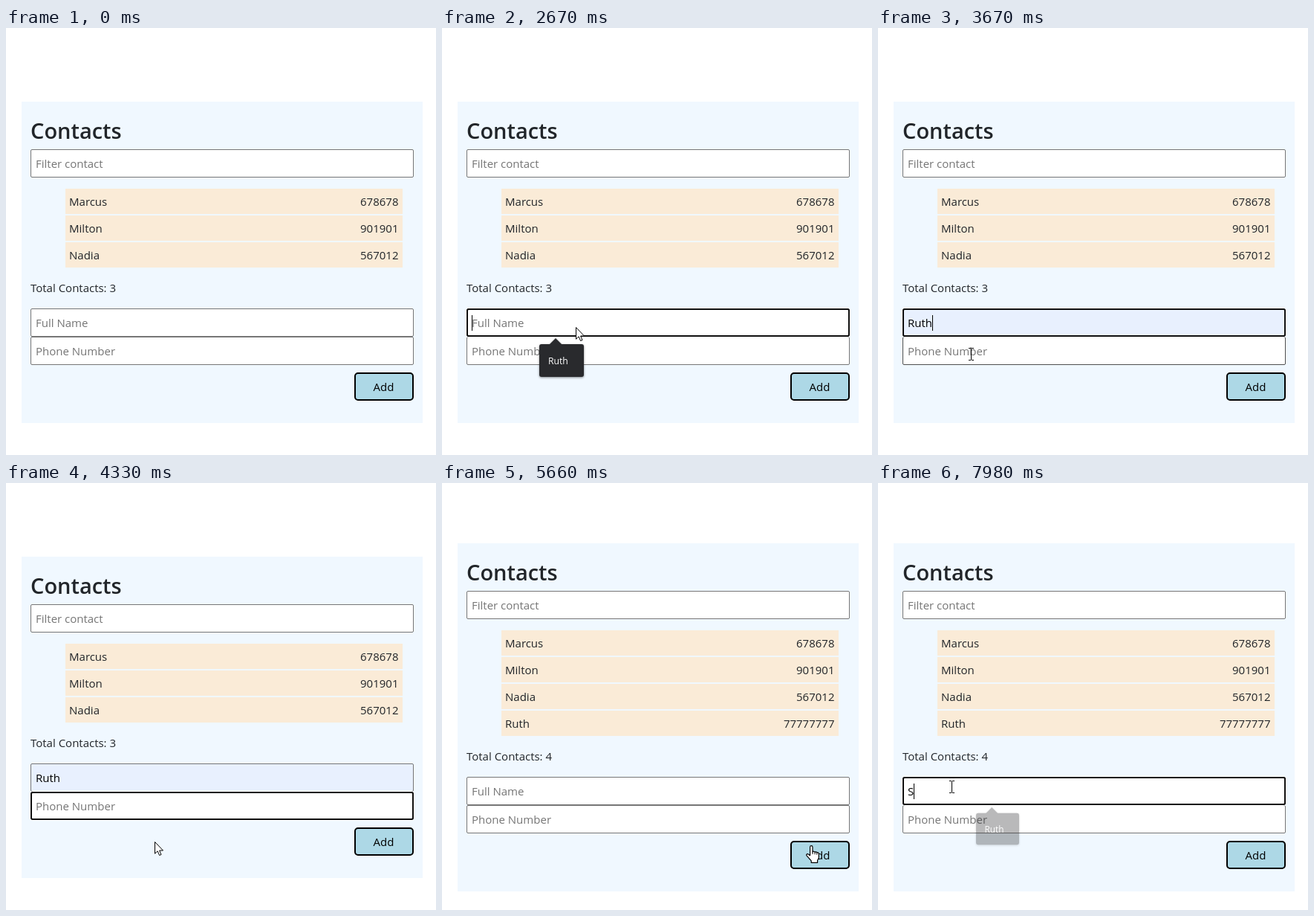
Recreate the animation shown at these times as an HTML page. Size 579 px wide and 574 px high, loop 8 s.

```html
<!DOCTYPE html>
<html lang="en">
<head>
<meta charset="utf-8">
<title>Contacts</title>
<style>
  html, body { margin: 0; width: 100%; height: 100%; overflow: hidden; background: #fff; }
  svg { display: block; font: 15px "Open Sans", "Noto Sans", sans-serif; fill: #212529; }
  text { white-space: pre; }
  .title { font-size: 29px; font-weight: 600; }
  .hint { fill: #757575; }
  .black { fill: #000; }
  .preview { font-size: 12.5px; fill: #000; }
  .popup { filter: drop-shadow(0 1px 1.5px rgba(0, 0, 0, .45)); }
  .popup text { font-size: 12.2px; fill: #fff; }
  .cursor { fill: #fff; stroke: #000; stroke-linejoin: round; }
</style>
</head>
<body>
<svg id="stage" width="579" height="574" viewBox="0 0 579 574"></svg>
<script>
const LOOP = 8000;
const stage = document.getElementById('stage');
const people = [['Marcus', '678678'], ['Milton', '901901'], ['Nadia', '567012'], ['Ruth', '77777777']];
const newName = people[3][0];
const digits = n => people[3][1].slice(0, n);

// Each step changes only the listed properties and then holds.
const steps = [
  [0, { count: 3, name: '', phone: '', caret: 0, focus: '', hover: '', popup: '', fill: false, preview: false, cursor: null }],
  [660, { cursor: ['arrow', 231, 459] }],
  [990, { cursor: ['beam', 191, 392], hover: 'name' }],
  [1330, { focus: 'name', caret: 40, popup: 'open' }],
  [2000, { caret: 0 }],
  [2340, { caret: 40 }],
  [2670, { cursor: ['arrow', 180, 402] }],
  [3000, { cursor: ['arrow', 168, 443], caret: 0, popup: 'hover', name: newName, fill: true, preview: true, hover: '' }],
  [3340, { popup: 'fade', preview: false, caret: 73 }],
  [3670, { popup: '', cursor: ['beam', 122, 430], hover: 'phone' }],
  [4000, { focus: 'phone', hover: '', caret: 40, cursor: ['arrow', 200, 482] }],
  [4330, { caret: 0 }],
  [4660, { caret: 66, phone: digits(3) }],
  [4990, { caret: 91, phone: digits(6), cursor: ['arrow', 372, 502] }],
  [5320, { caret: 109, phone: digits(8), cursor: ['hand', 487, 494] }],
  [5660, { count: 4, name: '', phone: '', fill: false, focus: '', caret: 0, cursor: ['hand', 490, 487] }],
  [5990, { cursor: ['beam', 96, 400], hover: 'name' }],
  [6330, { focus: 'name', caret: 40, popup: 'open' }],
  [6980, { caret: 0 }],
  [7310, { caret: 40 }],
  [7980, { caret: 48, name: 'S', popup: 'fade' }]
];
let last = {};
const states = steps.map(([time, change]) => (last = { ...last, ...change, time }));

const shapes = {
  arrow: '<path d="M.5 .5V16.2L4.1 12.8L6.6 18.5L9 17.5L6.6 12H11.5Z"/>',
  beam: '<path fill="none" d="M0 .5H3M4 .5H7M3.5 1V16M0 16.5H3M4 16.5H7"/>',
  hand: '<path stroke-width="1.2" d="M5.6 14V2.4a1.7 1.7 0 0 1 3.4 0V9c.3-1.2 2.9-1 3.1.4c.6-.9 2.5-.6 2.7.6c.8-.6 2.6-.1 2.6 1.3V17l-1.8 3.2V23.3H7.2V20.8L1 13.8c-.9-1.6 1.2-3 2.6-1.6L5.6 14"/>' +
    '<path fill="none" d="M9 9v3M12.1 9.6v2.7M14.8 10.2v2.5"/>'
};

const rect = (x, y, w, h, fill, rx = 0, more = '') =>
  `<rect x="${x}" y="${y}" width="${w}" height="${h}" rx="${rx}" fill="${fill}" ${more}/>`;
const text = (x, y, value, cls = '', anchor = 'start') =>
  `<text x="${x}" y="${y}" class="${cls}" text-anchor="${anchor}">${value}</text>`;

function field(y, hint, value = '', { hover, fill, preview } = {}) {
  return rect(33.5, y + .5, 515, 37, fill ? '#e8f0fe' : '#fff', 1.5, `stroke="${hover ? '#4f4f4f' : '#767676'}"`) +
    (value
      ? text(40, y + (preview ? 24.5 : 25), value, preview ? 'preview' : 'black')
      : text(40, y + 25, hint, 'hint'));
}

function ring(y) {
  return rect(32.5, y - .5, 517, 39, 'none', 3, 'stroke="#fff"') +
    rect(34, y + 1, 514, 36, 'none', 2, 'stroke="#101010" stroke-width="2"');
}

function suggestion(y, mode) {
  const fade = mode === 'fade'
    ? `opacity=".32" transform="translate(161 ${y + 70}) scale(.967) translate(-161 ${-y - 70})"` : '';
  return `<g class="popup" ${fade}>` +
    `<path fill="#292a2d" d="M144 ${y + 49}L153 ${y + 40}L162 ${y + 49}Z"/>` +
    rect(131, y + 48, 60, 44, '#292a2d', 3) +
    (mode === 'hover' ? rect(131, y + 53, 60, 34, '#3f4042') : '') +
    text(143, y + 75, newName) + '</g>';
}

function row([name, number], i, top) {
  const y = top + 117 + i * 36;
  return rect(80, y, 454, 34, '#faebd7') +
    text(85, y + 23, name) + text(528.5, y + 23, number, '', 'end');
}

function draw(s) {
  const grow = (s.count - 3) * 18;
  const top = 99 - grow;
  const nameY = 377 + grow, phoneY = nameY + 38;
  const focusY = s.focus === 'name' ? nameY : phoneY;
  let out = rect(21, top, 540, 432 + 2 * grow, '#f0f8ff') +
    text(33, top + 50, 'Contacts', 'title') +
    field(top + 64, 'Filter contact') +
    people.slice(0, s.count).map((p, i) => row(p, i, top)).join('') +
    text(33, nameY - 22, 'Total Contacts: ' + s.count) +
    field(nameY, 'Full Name', s.name, { hover: s.hover === 'name', fill: s.fill, preview: s.preview }) +
    field(phoneY, 'Phone Number', s.phone, { hover: s.hover === 'phone' }) +
    rect(470, nameY + 87, 78, 36, '#add8e6', 4, 'stroke="#000" stroke-width="2"') +
    text(508.5, nameY + 111, 'Add', 'black', 'middle');
  if (s.focus) out += ring(focusY);
  if (s.caret) out += rect(s.caret, focusY + 9, 1, 21, '#000');
  if (s.popup) out += suggestion(nameY, s.popup);
  if (s.cursor) {
    const [kind, x, y] = s.cursor;
    out += `<g class="cursor" transform="translate(${x} ${y})">${shapes[kind]}</g>`;
  }
  stage.innerHTML = out;
}

const start = performance.now();
let shown;
function tick(now) {
  const t = Math.max(0, now - start) % LOOP;
  const state = states.findLast(s => s.time <= t);
  if (state !== shown) draw(shown = state);
  requestAnimationFrame(tick);
}
tick(start);
</script>
</body>
</html>
```
